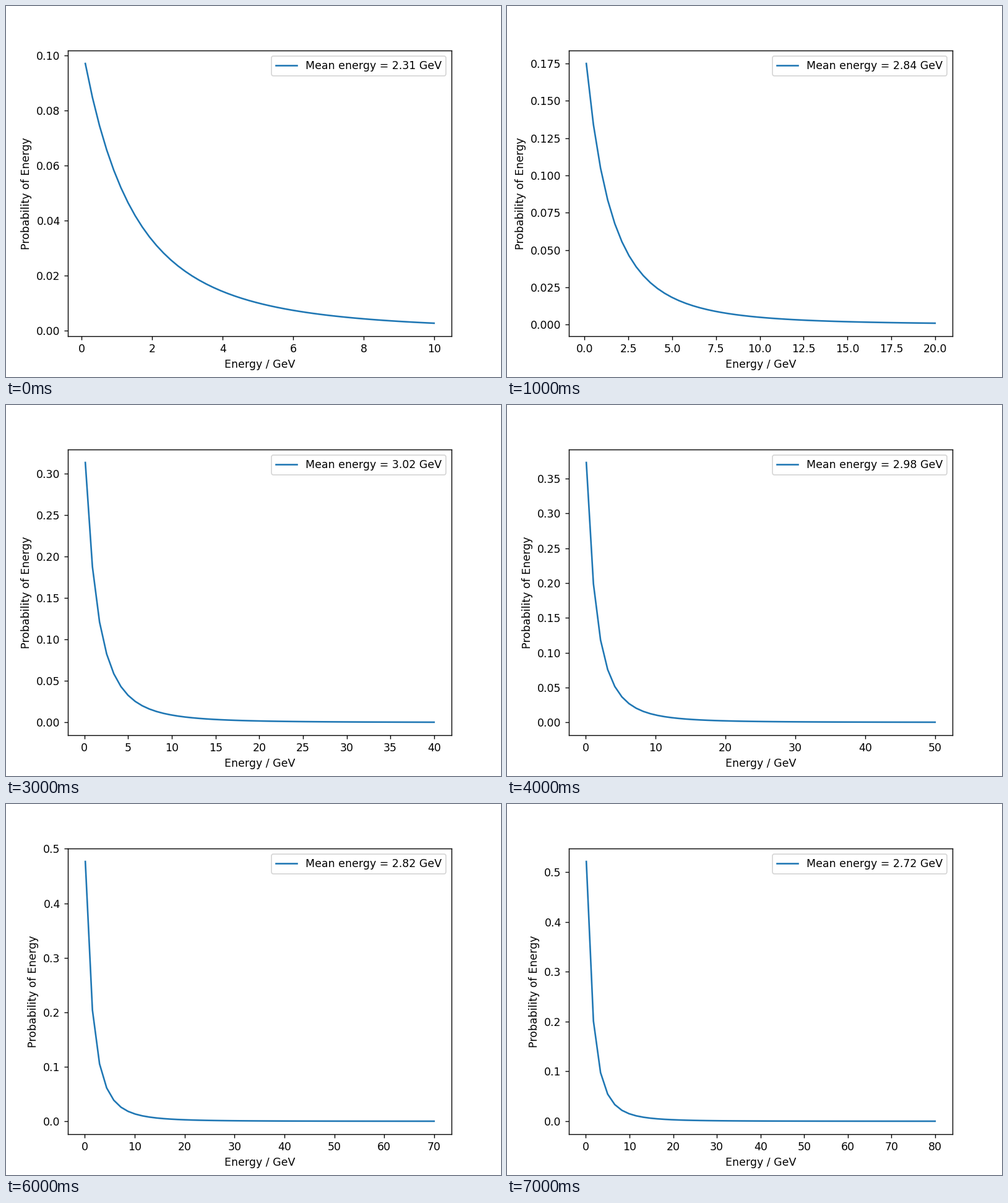
Recreate the animation shown at these times as a matplotlib script. Size 800 by 600 pixels, loop 8 s.

```python
import numpy as np
import matplotlib.pyplot as plt
from matplotlib.animation import FuncAnimation

FRAMES = 8
POINTS = 50

# Muon energy spectrum parameters (GeV)
E0 = 4.29
EPS = 854
N = 3.01


def spectrum(e_max):
    """Energies and their probabilities, normalised over the sampled range."""
    energy = np.linspace(0.1, e_max, POINTS)
    weight = (E0 + energy) ** -N / (1 + energy / EPS)
    return energy, weight / weight.sum()


fig, ax = plt.subplots(figsize=(6.4, 4.8), dpi=125)


def draw(i):
    energy, prob = spectrum(10 * (i + 1))
    mean = np.sum(energy * prob)
    ax.clear()
    ax.plot(energy, prob, label=f"Mean energy = {mean:.2f} GeV")
    ax.set_xlabel("Energy / GeV")
    ax.set_ylabel("Probability of Energy")
    ax.legend(loc="upper right")


anim = FuncAnimation(fig, draw, frames=FRAMES, init_func=lambda: draw(0),
                     interval=1000, repeat=True, repeat_delay=0)

plt.show()
```
